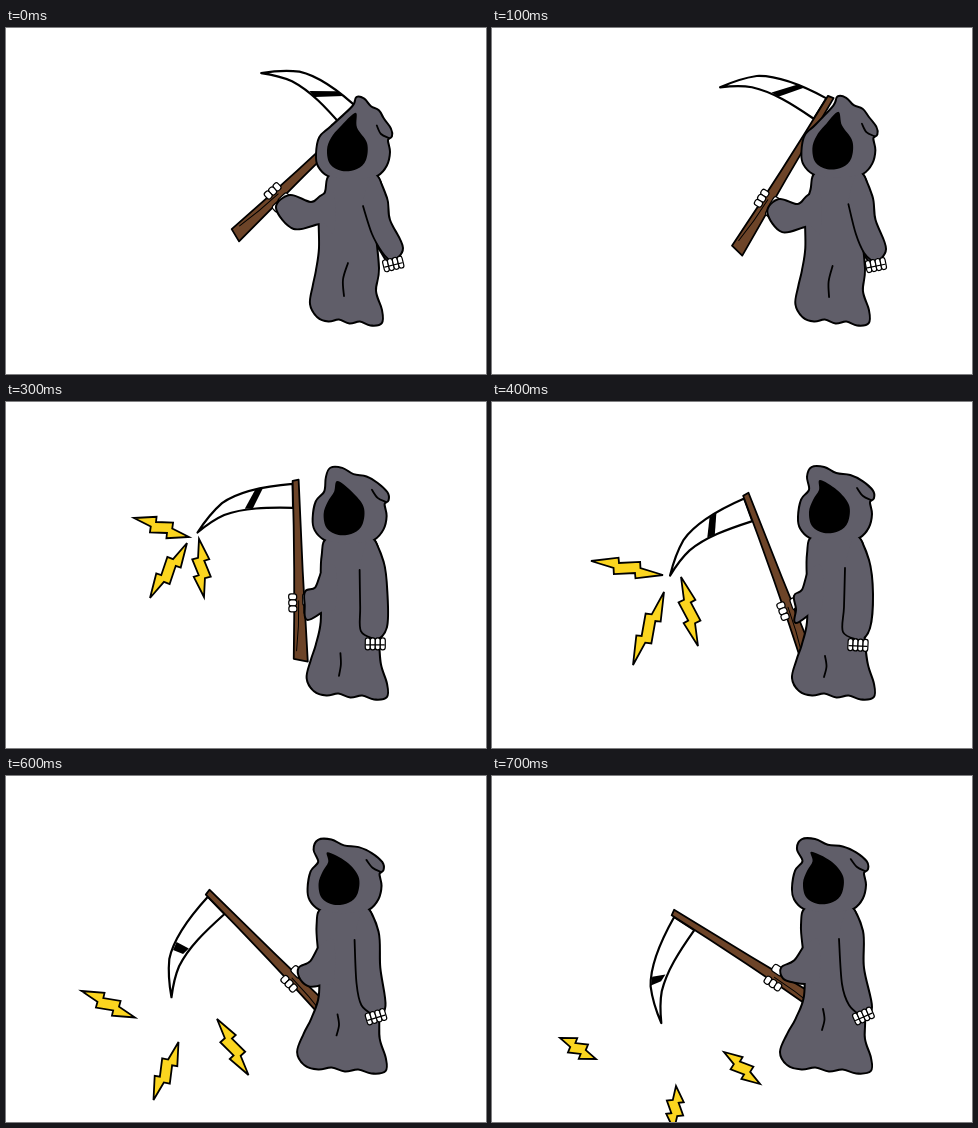
Write an HTML page that moves like this. It is 480 by 346 pixels and loops after 0.8 s.

```html
<!DOCTYPE html>
<html lang="en">
<head>
<meta charset="utf-8">
<title>Reaper swinging a scythe</title>
<style>
  html, body { margin: 0; width: 100%; height: 100%; overflow: hidden; background: #fff; }
  svg { display: block; width: 100vw; height: 100vh; }
  .line { stroke: #000; stroke-width: 1.8; stroke-linejoin: round; stroke-linecap: round; }
  .thin { fill: none; }
  .bone { fill: #fff; stroke-width: 1.2; }
</style>
</head>
<body>
<svg viewBox="0 0 480 346">
  <defs>
    <g id="cloth">
      <path id="torso"/><path id="leftSleeve"/><path id="rightSleeve"/><path id="hood"/>
    </g>
  </defs>
  <g id="bolts" class="line" fill="#fbd51f" style="stroke-linejoin:miter"></g>
  <g id="scythe" class="line">
    <path fill="#fff" stroke-width="2.2"
      d="M-3 3C-35 5-58 10-74 21Q-87 32-99 50Q-84 38-72 33C-52 26-30 26-3 27Z"/>
    <path id="bar" stroke="none"/>
    <path fill="#6d4428" d="M-3 0L3-1Q5 90 9 181L-5 178Q-2 90-3 0Z"/>
    <path class="thin" style="stroke-width:1" d="M-2 170Q1 145 1 120"/>
    <g id="grip" class="bone"></g>
  </g>
  <use href="#cloth" class="line" fill="#605e69" style="stroke-width:4"/>
  <use href="#cloth" fill="#605e69"/>
  <path id="face"/>
  <path id="flap" class="line thin"/>
  <path id="arm" class="line thin"/>
  <path id="fold" class="line thin"/>
  <g id="hand" class="line bone"></g>
</svg>
<script>
const STEP = 100, COUNT = 8;
const $ = id => document.getElementById(id);
const mix = (a, b, t) => Array.isArray(a) ? a.map((v, i) => mix(v, b[i], t)) : a + (b - a) * t;
const clamp = v => Math.max(0, Math.min(1, v));
const ease = v => { const t = clamp(v); return t * t * (3 - 2 * t); };
const pairs = s => s.split(" ").map(p => p.split(",").map(Number));
const setPath = (id, d) => $(id).setAttribute("d", d);
const polygon = pts => "M" + pts.join(" ") + "Z";

// Catmull-Rom curve through points
function smooth(pts, closed = true) {
  const n = pts.length;
  const at = i => pts[closed ? (i + n) % n : Math.max(0, Math.min(n - 1, i))];
  let d = "M" + at(0);
  for (let i = 0; i < (closed ? n : n - 1); i++) {
    const [a, b, c, e] = [at(i - 1), at(i), at(i + 1), at(i + 2)];
    const p = b.map((v, j) => v + (c[j] - a[j]) / 6);
    const q = c.map((v, j) => v - (e[j] - b[j]) / 6);
    d += `C${p} ${q} ${c}`;
  }
  return d + (closed ? "Z" : "");
}

// Head shapes are relative to the neck
const HOOD = pairs("-36,-19 -33,-36 -25,-46 -27,-59 -23,-68 -11,-68 1,-62 15,-60 27,-54 " +
  "37,-45 38,-38 34,-34 36,-22 33,-9 24,1 8,5 -10,5 -25,1 -34,-8");
const FACE = pairs("-15,-56 2,-46 14,-31 13,-14 4,-5 -11,-3 -23,-10 -26,-24 -22,-36 -16,-46");
const FLAP = pairs("36,-36 28,-40 22,-48");
const ANGLES = [47, 32, 9, -1, -20, -31, -44, -57];

// Each bolt runs from one point to another
const BURSTS = {
  3: ["128,116 183,135", "144,196 181,141", "198,195 193,137"],
  4: ["99,159 171,173", "141,263 172,190", "206,244 189,175"],
  5: ["83,168 154,200", "113,294 161,222", "217,290 190,210", "155,115 167,158", "243,186 197,194"],
  7: ["68,262 104,283", "182,354 184,310", "268,308 232,276"]
};
for (const k in BURSTS) BURSTS[k] = BURSTS[k].map(pairs);
BURSTS[6] = BURSTS[7].map((b, i) => mix(BURSTS[5][i], b, .5));

const ZIGZAG = pairs("0,0 .36,-.5 .38,-.2 .66,-.5 .68,-.15 1,0 .64,.5 .62,.2 .34,.5 .32,.15");
function bolt([[x0, y0], [x1, y1]]) {
  const dx = x1 - x0, dy = y1 - y0, s = 17 / Math.hypot(dx, dy);
  return `<path d="${polygon(ZIGZAG.map(([u, v]) =>
    [x0 + u * dx - v * s * dy, y0 + u * dy + v * s * dx]))}"/>`;
}

const capsule = (x, y, w, h) => `<rect x="${x}" y="${y}" width="${w}" height="${h}" rx="2.4"/>`;
$("grip").innerHTML = capsule(5, 113, 8, 12) + capsule(6, 123, 8, 11) +
  [113, 119, 125].map(y => capsule(-9, y, 8, 6)).join("");
$("hand").innerHTML = [-10, -5, 0, 5].map(x => capsule(x, -5, 5, 12)).join("") +
  '<path d="M-9 2H9"/>';

function draw(step) {
  // Three key poses: scythe raised, level, low
  const a = ease(step / 4), b = ease((step - 4) / 3);
  const key = (raised, level, low) => mix(mix(raised, level, a), low, b);

  const neck = key([347, 146], [343, 134], [337, 131]);
  const near = (x, y) => [neck[0] + x, neck[1] + y];
  const tilt = key(27, 0, -4);
  const head = pts => pts.map(([x, y]) => {
    const shift = tilt * clamp((-y - 44) / 16) * (38 - x) / 61;
    return near(x + shift, y - shift * .3);
  });
  setPath("hood", smooth(head(HOOD)));
  setPath("face", smooth(head(FACE)));
  setPath("flap", smooth(head(FLAP), false));

  const waist = key(314, 316, 313), hemL = key(305, 301, 289), hemR = key(375, 381, 378);
  const hem = [0, 1, 2, 3, 4, 5, 6].map(i =>
    [mix(hemL + 7, hemR, i / 6), 290 + i + (i % 2 ? 1.5 : -1.5)]);
  setPath("torso", smooth([
    near(-20, 0), near(-27, 18), [waist, 185], [waist, 220],
    [mix(hemL, waist, .65), 243], [mix(hemL, waist, .3), 258], [hemL, 276],
    ...hem, [hemR, 282], [hemR - 6, 263], [372, 240], [368, 190], near(28, 20), near(20, 0)
  ]));

  setPath("leftSleeve", smooth([
    [waist + 2, 168], key([305, 175], [311, 188], [303, 185]),
    key([284, 168], [303, 194], [290, 192]), key([271, 180], [305, 207], [292, 202]),
    key([288, 200], [304, 220], [304, 206]), [waist + 2, key(195, 211, 207)],
    [waist + 14, 205], [waist + 14, 165]
  ]));

  const cuff = key([384, 233], [366, 238], [370, 241]);
  const inside = [cuff, key([376, 224], [351, 230], [357, 229]),
    key([366, 206], [352, 205], [350, 208]), near(10, 32)];
  setPath("rightSleeve", smooth([
    near(20, 0), near(33, 24), [key(383, 380, 371), 192],
    key([396, 220], [377, 226], [379, 231]), ...inside
  ]));
  setPath("arm", smooth(inside, false));

  const top = key([342, 235], [333, 254], [331, 233]);
  const end = key([338, 268], [332, 275], [330, 254]);
  const middle = mix(top, end, .5);
  setPath("fold", smooth([top, [middle[0] + key(-3, 2, 2), middle[1]], end], false));

  // The mark slides along the blade as it falls
  const x = key(-30, -38, -69), foot = x + key(-19, -9, 9);
  const edge = u => 3 + u * u / 300;
  setPath("bar", polygon([[x - 4, edge(x - 4)], [x + 4, edge(x + 4)], [foot + 4, 27], [foot - 4, 27]]));

  const [gx, gy] = key([270, 168], [297, 208], [285, 203]);
  $("scythe").setAttribute("transform",
    `translate(${gx} ${gy}) rotate(${ANGLES[step]}) translate(-1 -123)`);
  const [hx, hy] = key([387, 235], [366, 242], [371, 239]);
  $("hand").setAttribute("transform",
    `translate(${hx} ${hy}) rotate(${key(-14, 3, -24)})`);
  $("bolts").innerHTML = (BURSTS[step] || []).map(bolt).join("");
}

let start = null, shown = 0;
function tick(now) {
  if (start === null) start = now;
  const step = Math.floor(Math.max(0, now - start) / STEP) % COUNT;
  if (step !== shown) draw(shown = step);
  requestAnimationFrame(tick);
}
draw(0);
requestAnimationFrame(tick);
</script>
</body>
</html>
```
